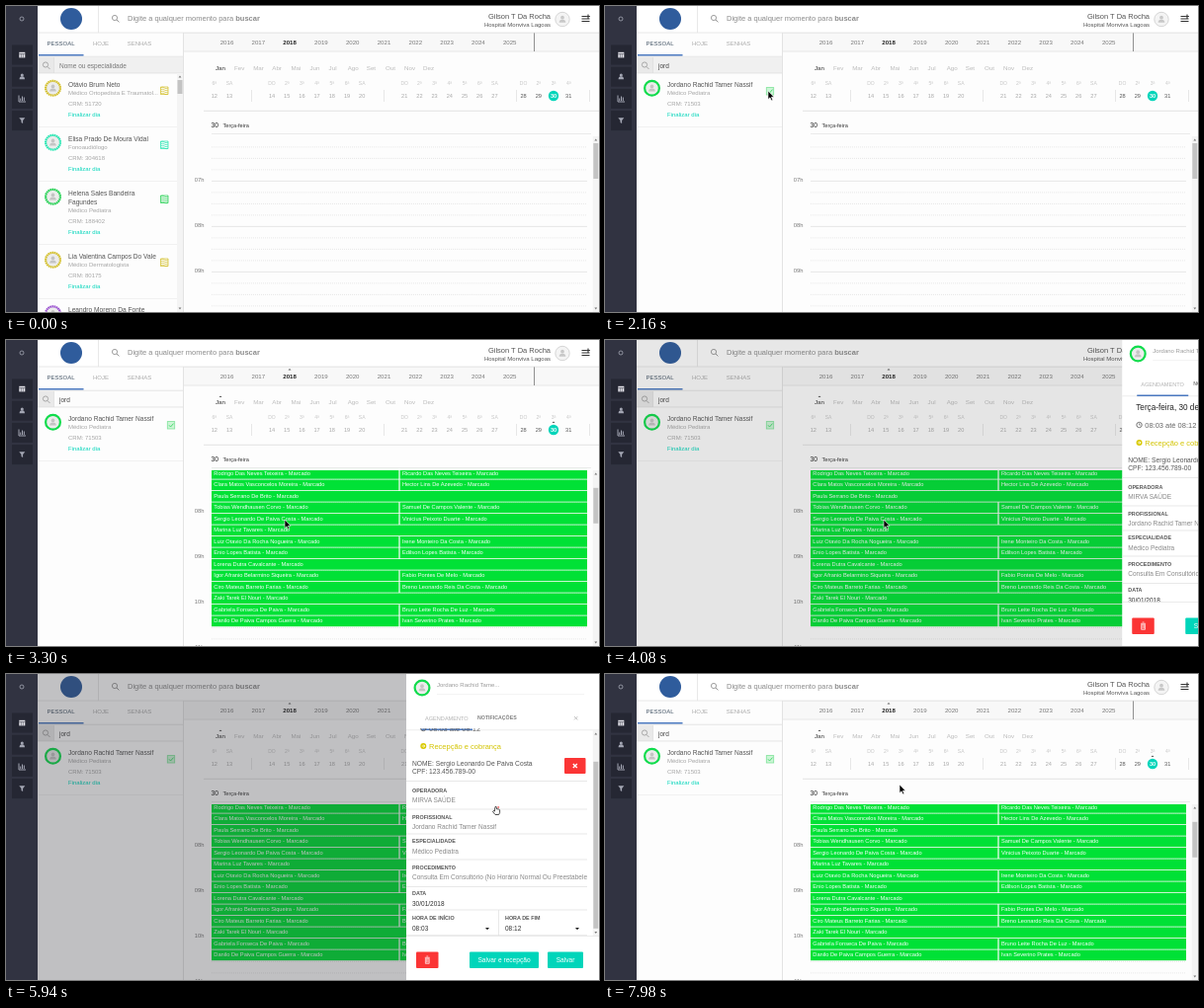
Write an HTML page that moves like this. It is 600 px wide and 310 px high and loops after 8 s.

```html
<!DOCTYPE html>
<html lang="pt">
<head>
<meta charset="utf-8">
<style>
html, body { margin: 0; width: 100%; height: 100%; overflow: hidden; background: #fff; }
svg { display: block; width: 600px; height: 310px; font-family: "Liberation Sans", Arial, sans-serif; }
text { white-space: pre; }
</style>
</head>
<body>
<svg id="stage" viewBox="0 0 600 310"></svg>
<script>
const LOOP = 8000, STEP = 60;
const GREEN = '#00e136', TEAL = '#00d5ba', BLUE = '#4a78c0', RED = '#fb3535';
const DOCTOR = 'Jordano Rachid Tamer Nassif';
const QUERY = 'jord';

// y is the vertical middle of the capitals
const text = (x, y, str, size, fill, extra = '') =>
  `<text x="${x}" y="${(y + size * 0.36).toFixed(2)}" font-size="${size}" fill="${fill}" ${extra}>${str}</text>`;
const rect = (x, y, w, h, fill, extra = '') =>
  `<rect x="${x}" y="${y}" width="${w}" height="${h}" fill="${fill}" ${extra}/>`;
const circle = (x, y, r, fill, extra = '') =>
  `<circle cx="${x}" cy="${y}" r="${r}" fill="${fill}" ${extra}/>`;
const path = (d, stroke, width = 1, fill = 'none', extra = '') =>
  `<path d="${d}" stroke="${stroke}" stroke-width="${width}" fill="${fill}" ${extra}/>`;
const group = (id, body, extra = '') => `<g id="${id}" ${extra}>${body}</g>`;
const range = (n, fn) => Array.from({ length: n }, (_, i) => fn(i)).join('');
const MID = 'text-anchor="middle"', END = 'text-anchor="end"', BOLD = 'font-weight="bold"';

const lens = (x, y, c) => circle(x, y, 2.6, 'none', `stroke="${c}" stroke-width=".8"`) +
  path(`M${x + 2} ${y + 2}l2.4 2.4`, c, 0.9);
const person = (x, y, s, c) => circle(x, y - 1.6 * s, 1.7 * s, c) +
  path(`M${x - 3 * s} ${y + 3 * s}q0 -3 ${3 * s} -3t${3 * s} 3z`, 'none', 0, c);
const avatar = (x, y, ring, extra = '') =>
  circle(x, y, 7.4, '#ececec', `stroke="${ring}" stroke-width="2.2" ${extra}`) + person(x, y, 1.1, '#c4c4c4');
const scrollbar = (x, top, bottom, id, thumbY, thumbH) =>
  rect(x, top, 6, bottom - top, '#f4f4f4') +
  path(`M${x + 1.6} ${top + 4.5}l1.4 -2l1.4 2zM${x + 1.6} ${bottom - 4.5}l1.4 2l1.4 -2z`, 'none', 0, '#777') +
  rect(x + 0.5, thumbY, 5, thumbH, '#c3c3c3', `id="${id}"`);

function sidebar() {
  const ink = '#a3a6b3';
  return rect(0, 0, 32, 310, '#313341') +
    circle(16, 13, 2, 'none', `stroke="${ink}" stroke-width=".8"`) +
    range(4, i => rect(6, 39.5 + i * 22.2, 21, 20, '#252733')) +
    rect(13.3, 46.8, 6, 5.6, '#e6e6ec') + path('M13.3 48.5h6M15.3 48.5v4M17.3 48.5v4', '#252733', 0.5) +
    person(16.3, 71.5, 0.9, ink) +
    path('M13 90.5v6.5h7M14.7 96v-2.5M16.5 96v-4.5M18.3 96v-3.5', ink, 1) +
    path('M13.3 113.2h6l-2.2 2.7v3l-1.6 -1v-2z', 'none', 0, ink);
}

function header() {
  return rect(32, 0, 568, 27, '#fff') +
    circle(66, 13, 11, '#2f5c9c') +
    path('M93.5 0V27', '#e2e2e2', 0.8) +
    lens(110, 12, '#888') +
    text(123, 12.4, 'Digite a qualquer momento para <tspan font-weight="bold">buscar</tspan>', 7.5, '#8b8b8b') +
    text(551, 10.2, 'Gilson T Da Rocha', 7.5, '#555', END) +
    text(551, 19.2, 'Hospital Monviva Lagoas', 6, '#555', END) +
    circle(563, 13.5, 7.2, '#f4f4f4', 'stroke="#ccc" stroke-width=".8"') + person(563, 13.5, 1.1, '#c8c8c8') +
    path('M582.5 10.5h4.5M582.5 13h8M582.5 15.5h8M589 8.6v3.8M587.1 10.5h3.8', '#333', 1.1);
}

const doctors = [
  { y: 79, color: '#d3bf28', name: ['Otávio Brum Neto'], role: 'Médico Ortopedista E Traumatol...', crm: 51720 },
  { y: 134, color: '#22e6b0', name: ['Elisa Prado De Moura Vidal'], role: 'Fonoaudiólogo', crm: 304618 },
  { y: 189, color: '#20d050', name: ['Helena Sales Bandeira', 'Fagundes'], role: 'Médico Pediatra', crm: 188402 },
  { y: 253, color: '#d3bf28', name: ['Lia Valentina Campos Do Vale'], role: 'Médico Dermatologista', crm: 80175 },
  { y: 307.5, color: '#9a4fd0', name: ['Leandro Moreno Da Fonte'], role: '', crm: 0 }
];

function doctorRow({ y, color, name, role, crm }, dashed = true) {
  const below = y + (name.length - 1) * 9;
  return avatar(47.5, y + 4.2, color, dashed ? 'stroke-dasharray="1.6 .5"' : '') +
    name.map((part, i) => text(63, y + 0.4 + i * 9, part, 6.6, '#555')).join('') +
    text(63, below + 9.3, role, 6, '#a5a5a5') +
    text(63, below + 19.7, 'CRM: ' + crm, 6, '#a5a5a5') +
    text(63, below + 30.6, 'Finalizar dia', 6, TEAL) +
    path(`M33 ${below + 43.5}H179`, '#ededed', 0.7);
}

const hatch = ({ y, color }) => path(
  range(4, i => `M156.5 ${y + 4 + i * 2}q2 -1.4 3.8 0t3.8 0`) + `M156.5 ${y + 3}h7.5v7.5h-7.5z`, color, 0.7);

function people() {
  const tab = (x, label, color) => text(x, 38, label, 6, color, MID);
  return rect(32, 27, 147, 283, '#fdfdfd') +
    tab(55.5, 'PESSOAL', '#456') + tab(96, 'HOJE', '#aaa') + tab(135, 'SENHAS', '#aaa') +
    path('M32 51.2H179', '#ddd', 0.8) + rect(33, 49, 45.5, 1.5, BLUE) +
    rect(32, 52, 147, 16, '#f0f0f0', 'id="searchField"') + rect(32, 52, 16.5, 16, '#e9e9e9') +
    path('M48.5 52V68M32 68H179', '#dcdcdc', 0.7) +
    lens(40, 59.5, '#999') + text(54, 60.5, '', 6.5, '#666', 'id="searchText"') +
    group('fullList', doctors.map(d => doctorRow(d) + hatch(d)).join('') + scrollbar(173, 68, 310, 'listThumb', 75, 14)) +
    group('oneDoctor', doctorRow({ y: 79, color: '#10dc4c', name: [DOCTOR], role: 'Médico Pediatra', crm: 71503 }, false) +
      rect(163.3, 82.6, 7.4, 7.4, '#ccf5d6', 'stroke="#7fe39a" stroke-width=".8"') +
      path('M165 86.3l1.5 1.7l3 -3.4', '#3cd765', 0.9)) +
    path('M179.5 27V310', '#dcdcdc', 0.8);
}

function calendar() {
  const months = ['Jan', 'Fev', 'Mar', 'Abr', 'Mai', 'Jun', 'Jul', 'Ago', 'Set', 'Out', 'Nov', 'Dez'];
  const weekdays = ['DO', '2ª', '3ª', '4ª', '5ª', '6ª', 'SA'];
  const day = n => {
    const weekday = n % 7, chosen = n === 30, current = n > 27;
    const x = 0.6 + Math.floor(n / 7) * 134.2 + weekday * 15.2 - (current ? 13.8 : 0);
    return text(x, 78, weekdays[weekday], 5, '#c6c6c6', MID) +
      (chosen ? circle(x, 91, 5.2, TEAL) : '') +
      text(x, 91, n, 5.6, chosen ? '#fff' : current ? '#555' : '#a8a8a8', MID + (chosen ? ' ' + BOLD : ''));
  };
  const tick = (x, y) => path(`M${x - 1.5} ${y + 1.5}l1.5 -1.5l1.5 1.5z`, 'none', 0, '#555');
  return rect(180, 27, 420, 283, '#fdfdfd') + rect(180, 27, 420, 19, '#f8f8f8') +
    path('M180 27H600M180 46H600', '#e2e2e2', 0.8) + path('M534.5 27V46', '#777', 0.8) +
    range(10, i => text(223.5 + i * 31.8, 37, 2016 + i, 6.1, i === 2 ? '#222' : '#777', MID + (i === 2 ? ' ' + BOLD : ''))) +
    months.map((m, i) => text(212 + i * 19.1, 63, m, 6.2, i ? '#bbb' : '#333')).join('') +
    range(20, i => day(i + 12)) +
    path('M248.5 85V97M382.5 85V97M516.5 85V97M590.5 85V97', '#ddd', 0.7) +
    group('ticks', tick(287, 29) + tick(217, 56.5) + tick(554, 82.5)) +
    path('M200 106.3H600', '#ddd', 0.8) +
    text(207.5, 121, '30', 6.7, '#222') + text(219.5, 121, 'Terça-feira', 5.6, '#333') +
    path('M208 129.5H592', '#e4e4e4', 0.7);
}

const visits = [
  'Rodrigo Das Neves Teixeira|Ricardo Das Neves Teixeira',
  'Clara Matos Vasconcelos Moreira|Hector Lins De Azevedo',
  'Paula Serrano De Brito',
  'Tobias Wendhausen Corvo|Samuel De Campos Valente',
  'Sergio Leonardo De Paiva Costa|Vinicius Peixoto Duarte',
  'Marina Luz Tavares',
  'Luiz Otavio Da Rocha Nogueira|Irene Monteiro Da Costa',
  'Enio Lopes Batista|Edilson Lopes Batista',
  'Lorena Dutra Cavalcante',
  'Igor Afranio Belarmino Siqueira|Fabio Pontes De Melo',
  'Ciro Mateus Barreto Farias|Breno Leonardo Reis Da Costa',
  'Zaki Tarek El Nouri',
  'Gabriela Fonseca De Paiva|Bruno Leite Rocha De Luz',
  'Danilo De Paiva Campos Guerra|Ivan Severino Prates'
].map(row => row.split('|'));

function schedule() {
  const top = 177, pitch = 11.5;
  const lines = range(22, i => {
    const y = top + 0.4 + (i - 4) * pitch;
    return path(`M208 ${y}H588`, '#dedede', 0.7, 'none', i % 4 ? 'stroke-dasharray="1 1"' : '');
  });
  const hours = range(5, i => text(200.5, 176 + i * 46, String(7 + i).padStart(2, '0') + 'h', 5.8, '#777', END));
  const events = visits.map((names, i) => {
    const y = top + i * pitch, width = names.length > 1 ? 189.4 : 380;
    return names.map((name, k) => rect(208 + k * 190.6, y, width, 10.7, GREEN) +
      text(210.3 + k * 190.6, y + 4.8, name + ' - Marcado', 5.7, '#fff')).join('');
  }).join('');
  return `<g clip-path="url(#scheduleClip)">` + group('scheduleBody', lines + group('hours', hours) + group('events', events)) + '</g>' +
    scrollbar(593.8, 132, 310, 'scheduleThumb', 139, 36);
}

function panel() {
  const field = (y, label, value, color = '#888', x = 411) =>
    text(x, y, label, 5.4, '#555', BOLD) + text(x, y + 9.7, value, 6.5, color);
  const rule = y => path(`M405 ${y}H588`, '#dedede', 0.7);
  const caret = x => path(`M${x - 2} 288h4l-2 2.2z`, 'none', 0, '#222');
  const button = (x, w, fill, label) => rect(x, 281.5, w, 16.5, fill, 'rx="1"') + text(x + w / 2, 289.5, label, 6.6, '#fff', MID);
  const body =
    text(419, 68.5, 'Terça-feira, 30 de Janeiro de 2018', 8.2, '#222') +
    circle(422.3, 86, 2.7, 'none', 'stroke="#666" stroke-width=".9"') + path('M422.3 84.3v1.8h1.3', '#666', 0.7) +
    text(428, 86, '08:03 até 08:12', 7.5, '#666') +
    circle(422.3, 104, 3, '#d8c900') + path('M420.7 104h3M422.4 102.6l1.4 1.4l-1.4 1.4', '#fff', 0.8) +
    text(428, 104, 'Recepção e cobrança', 7.5, '#d3c400') +
    text(411, 122, 'NOME: ' + visits[4][0], 6.7, '#555') + text(411, 130, 'CPF: 123.456.789-00', 6.7, '#555') +
    rect(565, 116, 21.5, 16, RED, 'rx="1"') + path('M573.8 122l4 4m0 -4l-4 4', '#fff', 1.4) +
    rule(139.5) + field(149, 'OPERADORA', 'MIRVA SAÚDE') +
    rule(168) + field(175.8, 'PROFISSIONAL', DOCTOR) +
    rule(193) + field(200.5, 'ESPECIALIDADE', 'Médico Pediatra') +
    rule(219) + field(227, 'PROCEDIMENTO', 'Consulta Em Consultório (No Horário Normal Ou Preestabelecido)') +
    rule(246.5) + field(253.5, 'DATA', '30/01/2018', '#333') +
    rule(270) + field(278.5, 'HORA DE INÍCIO', '08:03', '#333') + field(278.5, 'HORA DE FIM', '08:12', '#333', 505) +
    path('M498.5 270V296', '#dedede', 0.7) + caret(487) + caret(578) + rule(295.7);
  return rect(405, 0, 195, 310, '#fff') +
    avatar(421, 14, '#10dc4c') + text(436, 11, DOCTOR.slice(0, 19) + '...', 6, '#999') +
    path('M436 20.5H585', '#eee', 0.7) +
    text(424, 44.5, 'AGENDAMENTO', 5.6, '#b2b2b2') + text(477, 44.5, 'NOTIFICAÇÕES', 5.25, '#808080', BOLD) +
    path('M575 43l3.4 3.4m0 -3.4l-3.4 3.4', '#aaa', 0.7) +
    path('M405 56.8H600', '#e6e6e6', 0.7) + rect(420, 55.5, 52, 1.5, BLUE) +
    `<g clip-path="url(#panelClip)">${group('panelBody', body)}</g>` +
    scrollbar(593.8, 57, 265.5, 'panelThumb', 64, 169) +
    path('M405 265.5H600', '#e2e2e2', 0.7) +
    button(415, 22.5, RED, '') + path('M423.8 287.3h5M425.4 286h1.8M424.4 288.3h3.8v5h-3.8zM425.7 289v3.5M427 289v3.5', '#fff', 0.7) +
    button(469, 70, TEAL, 'Salvar e recepção') + button(548, 36, TEAL, 'Salvar');
}

const pointers =
  group('arrow', path('M0 0V8.6L2 6.8L3.3 9.8L4.7 9.2L3.4 6.3H6Z', '#fff', 0.6, '#000')) +
  group('hand', path('M-1.2 -2.5q0 -1.6 1.2 -1.2l.6 2.6q2.6 -.6 3 1.1v2.5l-1 2h-3.6l-2.6 -3.2q.4 -1.4 2 -.2z', '#222', 0.8, '#fff') +
    circle(2.2, -3, 1, '#f07070'));

const stage = document.getElementById('stage');
stage.innerHTML = `<defs>
  <clipPath id="scheduleClip"><rect x="181" y="132" width="412" height="178"/></clipPath>
  <clipPath id="panelClip"><rect x="405" y="55" width="183" height="210.5"/></clipPath></defs>` +
  people() + calendar() + schedule() + header() + path('M32 27H600', '#e2e2e2', 0.8) +
  rect(32, 0, 568, 310, '#323438', 'id="shade"') + sidebar() + group('panel', panel()) + group('pointer', pointers);

const parts = {};
stage.querySelectorAll('[id]').forEach(el => { parts[el.id] = el; });
const set = (id, name, value) => parts[id].setAttribute(name, value);
const show = (id, on) => set(id, 'display', on ? 'inline' : 'none');
const move = (id, x, y) => set(id, 'transform', `translate(${x} ${y})`);
const progress = (t, from, to) => Math.min(1, Math.max(0, (t - from) / (to - from)));
const smooth = p => p * p * (3 - 2 * p);

// [start, end, x, y] of each pointer movement
const moves = [
  [1080, 1560, 165, 86], [2160, 2460, 323, 175], [2940, 3300, 282, 182],
  [4560, 4920, 496, 138], [5940, 6420, 425, 122], [6660, 7320, 298, 112]
];

function pointerAt(t) {
  let x = 110, y = 62;
  for (const [from, to, toX, toY] of moves) {
    const p = smooth(progress(t, from, to));
    x += (toX - x) * p;
    y += (toY - y) * p;
  }
  return [x, y];
}

function typedAt(t) {
  return QUERY.slice(0, [60, 480, 540, 960].filter(at => t >= at).length);
}

function draw(time) {
  const t = Math.floor(time / STEP) * STEP;
  const typed = typedAt(t), loaded = t >= 2220, filtered = t >= 540;
  parts.searchText.textContent = typed || 'Nome ou especialidade';
  set('searchText', 'fill', typed ? '#444' : '#777');
  set('searchField', 'fill', loaded ? '#fcfcfc' : '#f0f0f0');
  show('fullList', !filtered);
  show('oneDoctor', filtered);
  show('events', loaded);
  show('ticks', loaded);
  move('hours', 0, loaded ? -2 : 0);

  const scroll = 47 * progress(t, 2640, 2820);
  move('scheduleBody', 0, -scroll);
  set('scheduleThumb', 'y', 139 + scroll * 0.23);

  const open = smooth(progress(t, 3900, 4320)) * (1 - smooth(progress(t, 7620, 7980)));
  set('shade', 'opacity', 0.3 * open);
  show('panel', open > 0);
  move('panel', 195 * (1 - open), 0);

  const panelScroll = 24 * progress(t, 5160, 5400) + 7 * progress(t, 5520, 5640);
  move('panelBody', 0, -panelScroll);
  set('panelThumb', 'y', 64 + panelScroll * 0.8);

  const [x, y] = pointerAt(t);
  const overPanel = open === 1 && x > 405;
  show('pointer', t >= 1140);
  move('pointer', x, y);
  show('arrow', !overPanel);
  show('hand', overPanel);
}

function tick() {
  draw(performance.now() % LOOP);
  requestAnimationFrame(tick);
}
tick();
</script>
</body>
</html>
```
